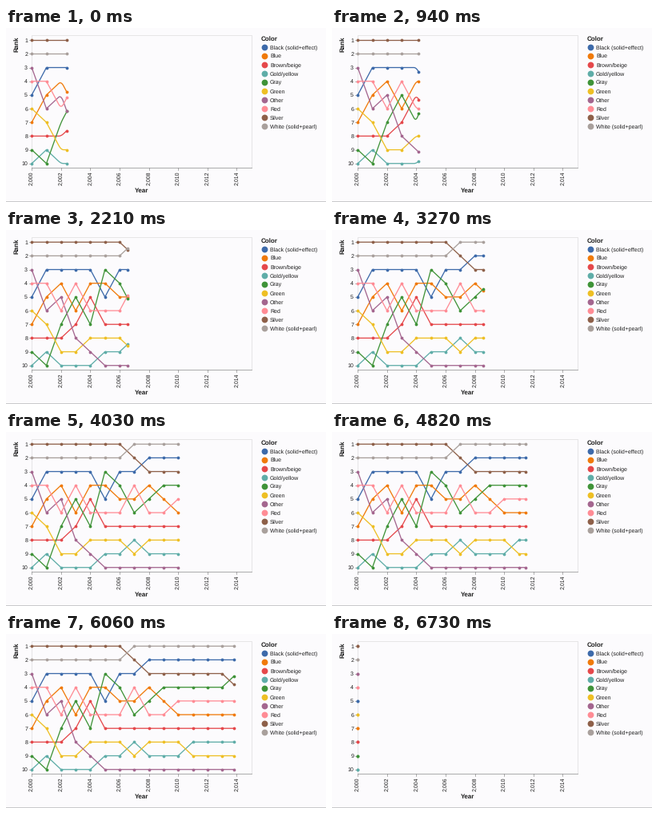
A matplotlib script that plays this animation: 400 by 218 pixels, repeating every 6760 ms.

```python
import numpy as np
import matplotlib
import matplotlib.pyplot as plt
from matplotlib.animation import FuncAnimation

matplotlib.rcParams["font.family"] = "Liberation Sans"
matplotlib.rcParams["text.hinting"] = "none"
matplotlib.rcParams["text.hinting_factor"] = 1

W, H, DPI = 400, 218, 100
LOOP, INTERVAL = 6760, 20
STEPS = 223                       # visible picture changes per loop
X0, YEAR_W = 32.2, 18.3
Y1, RANK_H = 15.2, 17.17
START, LAST = 2.40, 15            # years after 2000
DOT_DELAY = 0.45                  # a year's dot shows up this late
SOFT = 0.17                       # rounding of the newest corner, in years

INK = "#1c1c1c"
COLORS = {
    "Black (solid+effect)": "#3d6aaa", "Blue": "#f07a0a",
    "Brown/beige": "#e5484b", "Gold/yellow": "#5fada8",
    "Gray": "#3f9338", "Green": "#eebf24", "Other": "#a4668f",
    "Red": "#ff8c95", "Silver": "#8e6049", "White (solid+pearl)": "#a9a09c",
}
FIRST = ["Silver", "White (solid+pearl)", "Other", "Red",
         "Black (solid+effect)", "Green", "Blue", "Brown/beige",
         "Gray", "Gold/yellow"]
# In each chain the first place drops to the last link, the rest move up one.
SHIFTS = {
    1: [(3, 5, 7, 6), (9, 10)],
    2: [(4, 5, 6), (7, 10, 9)],
    3: [(4, 6), (5, 7, 8)],
    4: [(4, 6), (5, 7), (8, 9)],
    5: [(3, 7, 5), (9, 10)],
    6: [(3, 5, 4)],
    7: [(1, 2), (4, 6), (8, 9)],
    8: [(2, 3), (4, 5, 6), (8, 9)],
    9: [(4, 5)],
    10: [(5, 6)],
    11: [(8, 9)],
    14: [(3, 4)],
}


def px(size):
    return size * 72 / DPI


def to_x(year):
    return X0 + YEAR_W * np.asarray(year)


def to_y(rank):
    return Y1 + RANK_H * (np.asarray(rank) - 1)


def rank_history():
    order = list(FIRST)
    history = {name: [] for name in COLORS}
    for year in range(LAST + 1):
        for chain in SHIFTS.get(year, []):
            names = [order[place - 1] for place in chain]
            for place, name in zip(chain, names[1:] + names[:1]):
                order[place - 1] = name
        for rank, name in enumerate(order, 1):
            history[name].append(rank)
    return {name: np.array(ranks) for name, ranks in history.items()}


fig = plt.figure(figsize=(W / DPI, H / DPI), dpi=DPI, facecolor="#fcfbfd")
ax = fig.add_axes([0, 0, 1, 1])
ax.set_xlim(0, W)
ax.set_ylim(H, 0)
ax.axis("off")


def stroke(xs, ys, color="#8a8a8a", width=0.7, z=1):
    return ax.plot(xs, ys, color=color, lw=px(width), zorder=z)[0]


def label(x, y, text, size=6.9, **kw):
    kw.setdefault("va", "baseline")
    ax.text(x, y, text, fontsize=px(size), color=INK, **kw)


def title(x, y, text, **kw):
    label(x, y, text, 7.6, weight="bold", **kw)


def draw_frame():
    left, right, top, bottom = X0, float(to_x(LAST)), 9.5, 174.5
    stroke([left, left, right, right], [bottom, top, top, bottom], "#dddddd")
    stroke([left, right], [bottom, bottom])
    stroke([0, W], [216.5, 216.5], "#c9c9cb", 1)
    for rank in range(1, 11):
        y = float(to_y(rank))
        stroke([left - 3.6, left], [y, y])
        label(left - 5.1, y + 2.4, str(rank), ha="right")
    for year in range(0, LAST, 2):
        x = float(to_x(year))
        stroke([x, x], [bottom, bottom + 3.6])
        label(x + 0.2, bottom + 5.3, f"{2000 + year:,}", rotation=90,
              ha="center", va="top")
    title(13.2, 20.4, "Rank", rotation=90, ha="center", va="center")
    title(169.6, 205.6, "Year", ha="center")


def draw_legend():
    title(319, 15.8, "Color")
    for i, (name, color) in enumerate(COLORS.items()):
        y = 23.9 + 11.03 * i
        ax.plot(323, y, "o", color=color, ms=px(7.8), mew=0)
        label(330, y + 2.4, name)


def trail(ranks, year):
    """Path up to `year`; the corner stays soft until its dot appears."""
    k = int(year)
    f = year - k
    xs, ys = list(range(k + 1)), list(ranks[:k + 1])
    if f > 0:
        step_in, step_out = ranks[k] - ranks[k - 1], ranks[k + 1] - ranks[k]
        if f < DOT_DELAY:
            s = np.linspace(0, 1, 8)
            r = min(f, SOFT)
            back, ahead = r * (1 - s) ** 2, r * s ** 2
            xs[-1:] = list(k - back + ahead)
            ys[-1:] = list(ranks[k] - back * step_in + ahead * step_out)
        xs.append(year)
        ys.append(ranks[k] + f * step_out)
    return to_x(xs), to_y(ys)


draw_frame()
draw_legend()

history = rank_history()
tracks = []
for name, color in COLORS.items():
    line = stroke([], [], color, 1.3, 3)
    line.set_solid_joinstyle("round")
    dots = ax.plot([], [], "o", color=color, ms=px(3.8), mew=0, zorder=4)[0]
    tracks.append((history[name], line, dots))


def update(i):
    step = int((i + 0.5) * INTERVAL * STEPS / LOOP + 0.15)
    year = START + (LAST - START) * step / (STEPS - 2)
    if step > STEPS - 2:
        year = 0
    for ranks, line, dots in tracks:
        xs, ys = trail(ranks, year)
        line.set_data(xs, ys)
        past = np.arange(int(year - DOT_DELAY) + 1)
        dots.set_data(np.append(to_x(past), xs[-1]),
                      np.append(to_y(ranks[past]), ys[-1]))
    return []


anim = FuncAnimation(fig, update, frames=LOOP // INTERVAL, interval=INTERVAL,
                     repeat=True, repeat_delay=0, cache_frame_data=False)
plt.show()
```
